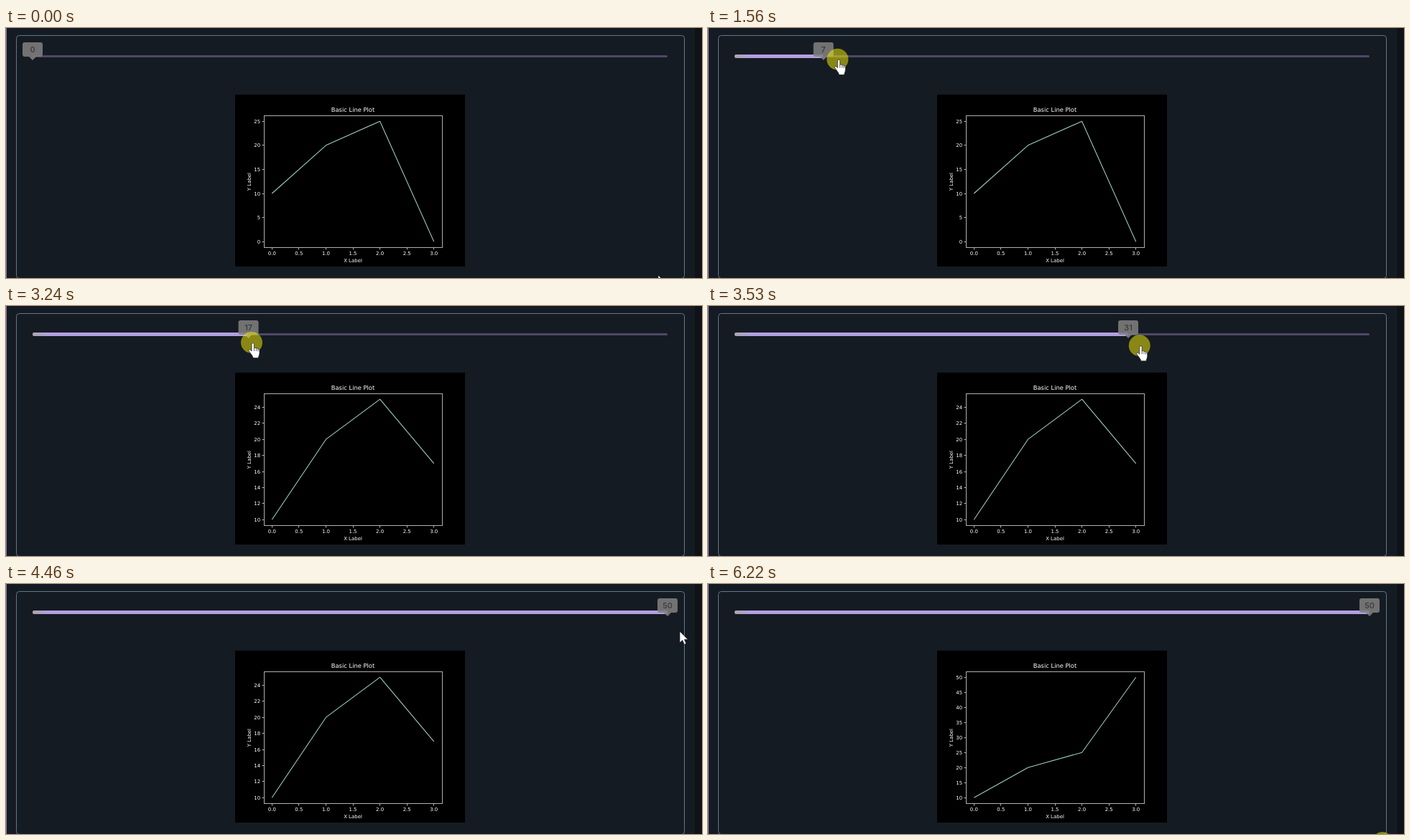
These frames come from a looping animation (969x349 px, 6360 ms). An HTML page:

```html
<!DOCTYPE html>
<html lang="en">
<head>
<meta charset="utf-8">
<title>Slider driven line plot</title>
<style>
html, body { margin: 0; width: 100%; height: 100%; overflow: hidden; background: #151b22; }
svg { display: block; width: 969px; height: 349px; }
.plot text { font: 6.94px "DejaVu Sans", sans-serif; fill: #fff; text-rendering: geometricPrecision; }
.plot .title { font-size: 8.33px; }
.axis { fill: none; stroke: #b0b0b0; }
.line { fill: none; stroke: #9fcfc1; stroke-width: 1.05; stroke-linejoin: round; }
.mid { text-anchor: middle; }
.end { text-anchor: end; }
#label { font: 500 11px Inter, sans-serif; fill: #3c3c3c; text-anchor: middle; }
#arrow, #hand { stroke: #15181c; stroke-width: .7; fill: #fff; stroke-linejoin: round; }
</style>
</head>
<body>
<svg viewBox="0 0 969 349">
  <defs>
    <linearGradient id="tint" gradientUnits="userSpaceOnUse" x1="37" y1="0" x2="60" y2="0">
      <stop offset="0" stop-color="#aaa6a8"/>
      <stop offset="1" stop-color="#b29fe2"/>
    </linearGradient>
  </defs>
  <rect width="969" height="349" fill="#151b22"/>
  <rect x="959" width="10" height="349" fill="#0f1317"/>
  <rect width="1" height="349" fill="#8a7bb8"/>
  <rect x="14.5" y="10.5" width="930" height="339" rx="4" fill="none" stroke="#61788a"/>

  <rect x="37" y="38" width="884" height="3" rx="1.5" fill="#4d4866"/>
  <rect id="fill" x="37" y="37" height="5" rx="2" fill="url(#tint)"/>
  <g id="bubble" opacity=".87">
    <path d="M-11 20H11Q14 20 14 23V37Q14 40 11 40H5L0 45L-5 40H-11Q-14 40-14 37V23Q-14 20-11 20Z" fill="#808080"/>
    <text id="label" y="34"></text>
  </g>

  <g class="plot">
    <rect x="319" y="93" width="320" height="240"/>
    <text class="title mid" x="483" y="117.4">Basic Line Plot</text>
    <text class="mid" x="483" y="326.6">X Label</text>
    <text class="mid" transform="translate(340.6 214.6) rotate(-90)">Y Label</text>
    <g id="xticks"></g>
    <g id="charts"></g>
    <rect class="axis" x="359.5" y="122.5" width="248" height="184"/>
  </g>

  <g id="cursor">
    <circle id="halo" r="15" fill="#f2ea0a" fill-opacity=".53"/>
    <path id="arrow" d="M0 0V16L3.8 12.6L6.3 18.4L9 17.2L6.5 11.6H11.4Z"/>
    <g id="hand">
      <path d="M0 2C0 .2 3.4 .2 3.4 2V8C4 6.8 6.2 7 6.3 8.5C6.9 7.6 8.7 8 8.8 9.4C9.5 8.7 11 9.2 11 10.8V14.5C11 17.5 9.7 18.2 9.4 21.6H2C1.8 19 0 17.5-1.2 15.5L-3.9 11.7C-4.8 10-2.9 9-1.6 10.4L0 12Z"/>
      <path d="M3.4 8V12M6.3 8.6V12M8.8 9.5V12.4" fill="none"/>
    </g>
  </g>
</svg>
<script>
const LOOP = 6360;
const $ = id => document.getElementById(id);

// Plot geometry
const px = v => 370.3 + v * 75.15;
const charts = [
  { from: 0,    last: 0,  low: 0,  high: 25, step: 5, top: 25 },
  { from: 2560, last: 17, low: 10, high: 25, step: 2, top: 24 },
  { from: 4590, last: 50, low: 10, high: 50, step: 5, top: 50 }
];

function chartMarkup(c) {
  const py = v => 298.2 - (v - c.low) / (c.high - c.low) * 168;
  let out = "";
  for (let v = c.low; v <= c.top; v += c.step) {
    const y = py(v);
    out += `<path class="axis" d="M356.5 ${Math.floor(y) + .5}H359"/>` +
           `<text class="end" x="354.1" y="${y + 2.6}">${v}</text>`;
  }
  const points = [10, 20, 25, c.last].map((v, i) => `${px(i)},${py(v)}`);
  return `<g>${out}<polyline class="line" points="${points.join(" ")}"/></g>`;
}

let ticks = "";
for (let v = 0; v <= 3; v += .5) {
  ticks += `<path class="axis" d="M${Math.floor(px(v)) + .5} 307V309.5"/>` +
           `<text class="mid" x="${px(v)}" y="316.8">${v.toFixed(1)}</text>`;
}
$("xticks").innerHTML = ticks;
$("charts").innerHTML = charts.map(chartMarkup).join("");
const chartNodes = [...$("charts").children];

// Pointer moves: start, end, steps, x, y, easing
const smooth = u => u * u * (3 - 2 * u);
const glide = u => smooth(u * .96) / smooth(.96);
const linear = u => u;
const speedUp = u => u * u;
const moves = [
  [70, 630, 9, 67, 51, glide],
  [710, 710, 1, 47, 38, linear],
  [1190, 1190, 1, 59, 38, linear],
  [1280, 1780, 8, 316, 50, glide],
  [1860, 1930, 2, 340, 51, linear],
  [3240, 3240, 1, 342, 51, linear],
  [3310, 3810, 8, 890, 60, glide],
  [3880, 3880, 1, 911, 62, linear],
  [3950, 4090, 3, 932, 62, linear],
  [4240, 4310, 2, 938, 66, linear],
  [5040, 5640, 9, 921, 195, speedUp],
  [5700, 5920, 4, 932, 374, linear],
  [6220, 6220, 1, 939, 361, linear]
];

function pointer(t) {
  let x = 908, y = 345;
  for (const [start, end, n, toX, toY, ease] of moves) {
    if (t < start) break;
    const gap = n > 1 ? (end - start) / (n - 1) : 1;
    const step = Math.min(n, Math.floor((t - start) / gap + 1e-6) + 1);
    const u = ease(step / n);
    x += (toX - x) * u;
    y += (toY - y) * u;
  }
  return [x, y];
}

const UNIT = 17.68;
function sliderValue(t, x) {
  if (t >= 4020) return 50;
  if (t >= 3950) return 49;
  if (t >= 3810) return 48;
  const dragged = Math.floor((x - 47) / UNIT);
  if (t >= 3310) return Math.max(17, dragged);
  if (t >= 2000) return 17;
  return t >= 1190 ? dragged : 0;
}

const show = (node, on) => node.setAttribute("visibility", on ? "visible" : "hidden");

function draw(t) {
  const [x, y] = pointer(t);
  const value = sliderValue(t, x);
  const thumb = value * UNIT;
  $("fill").setAttribute("width", thumb);
  $("bubble").setAttribute("transform", `translate(${37 + thumb} 0)`);
  $("label").textContent = value;

  $("cursor").setAttribute("transform", `translate(${x} ${y})`);
  const hand = t >= 710 && t < 3880;
  show($("hand"), hand);
  show($("arrow"), !hand);
  show($("halo"), t >= 1010 && t < 4390 || t >= 6220);

  const current = charts.filter(c => t >= c.from).length - 1;
  chartNodes.forEach((node, i) => show(node, i === current));
}

const begin = performance.now();
function tick() {
  draw((performance.now() - begin) % LOOP);
  requestAnimationFrame(tick);
}
draw(0);
requestAnimationFrame(tick);
</script>
</body>
</html>
```
